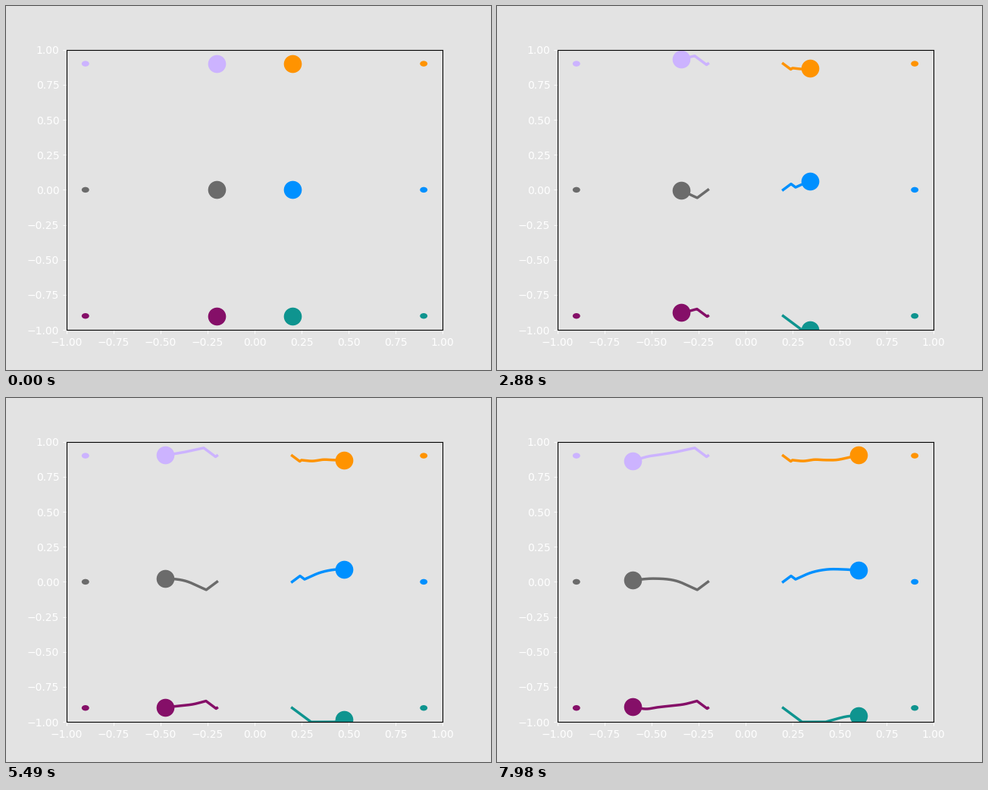
A matplotlib script that plays this animation: 640 by 480 pixels, repeating every 8000 ms.

```python
import numpy as np
import matplotlib.pyplot as plt
from matplotlib.animation import FuncAnimation
from matplotlib.patches import Circle

LOOP, INTERVAL = 8000, 20   # ms
STEP_MS, SPEED = 30, 0.0015  # time and distance of one simulation step
REACH = 0.4                  # distance covered in one loop
BACK = "#e3e3e3"

# side, row, colour, first direction, steps at which it turns,
# heights passed afterwards at even spacing
AGENTS = [
    (-1, .9, "#ccb3ff", -1, [5, 47], [.931, .9115, .895, .863]),
    (-1, 0, "#6b6b6b", -1, [38], [.0075, .0232, .012]),
    (-1, -.9, "#850f68", -1, [3, 39], [-.8735, -.8845, -.8945, -.907, -.891]),
    (1, .9, "#ff9300", -1, [27, 33], [.862, .872, .869, .870, .885, .904]),
    (1, 0, "#0090ff", 1, [28, 44], [.066, .0883, .089, .082]),
    (1, -.9, "#0e948f", -1, [150], [-.978, -.960, -.955]),
]

steps = np.arange(LOOP // STEP_MS + 1)
dist = SPEED * steps


def zigzag(row, way, turns):
    """Diagonal start that flips at each turn and stops at the floor."""
    slope = way * (-1) ** np.searchsorted(turns, steps, side="right")
    climb = np.concatenate([[0], np.cumsum(slope[:-1])])
    return np.maximum(row + SPEED * climb, -1)


def smooth(x, px, py):
    """Cubic curve through evenly spaced points."""
    slope = np.gradient(py, px)
    h = px[1] - px[0]
    i = np.clip(((x - px[0]) / h).astype(int), 0, len(px) - 2)
    u = (x - px[i]) / h
    blend = u * u * (3 - 2 * u)
    bend = u * (1 - u) * (slope[i] * (1 - u) - slope[i + 1] * u)
    return py[i] + (py[i + 1] - py[i]) * blend + h * bend


def path(row, way, turns, heights):
    y = zigzag(row, way, turns)
    last = turns[-1]
    knots = np.linspace(dist[last], REACH, len(heights) + 1)
    y[last:] = smooth(dist[last:], knots, np.array([y[last], *heights]))
    return y


fig, ax = plt.subplots(figsize=(6.4, 4.8), dpi=100, facecolor=BACK)
ax.set_facecolor(BACK)
ax.set_xlim(-1, 1)
ax.set_ylim(-1, 1)
ax.tick_params(colors="white")

tracks = []
for side, row, color, way, turns, heights in AGENTS:
    ax.add_patch(Circle((.9 * side, row), .02, fc=color, lw=0))
    trail, = ax.plot([], [], color=color, lw=2.5)
    disc, = ax.plot([], [], "o", color=color, ms=16)
    tracks.append((trail, disc, side * (.2 + dist),
                   path(row, way, turns, heights)))


def update(frame):
    # mid-frame time picks the nearest simulation step
    n = int((frame + .5) * INTERVAL) // STEP_MS + 1
    for trail, disc, x, y in tracks:
        trail.set_data(x[:n], y[:n])
        disc.set_data(x[n - 1:n], y[n - 1:n])
    return [artist for track in tracks for artist in track[:2]]


anim = FuncAnimation(fig, update, frames=LOOP // INTERVAL, interval=INTERVAL,
                     repeat=True, repeat_delay=0)
plt.show()
```
